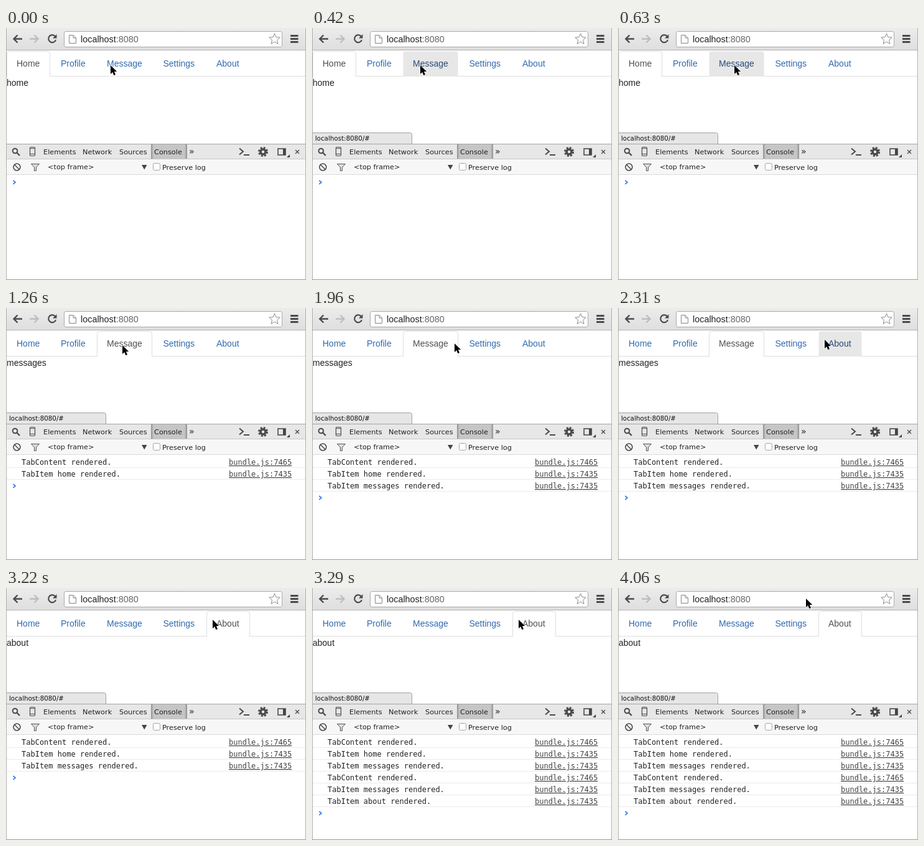
Animation, 482 px wide and 405 px high, one loop 4.13 s. Source, as an HTML page:

```html
<!DOCTYPE html>
<html lang="en">
<head>
<meta charset="utf-8">
<title>Tabs demo</title>
<style>
  html, body { margin: 0; width: 100%; height: 100%; overflow: hidden; background: #fff; }
  svg { display: block; width: 482px; height: 405px; }
  text { white-space: pre; }
  .page { font: 14px "Liberation Sans", Arial, sans-serif; fill: #222; }
  .url { font-size: 14.4px; }
  .ui { font: 11.3px "DejaVu Sans", sans-serif; fill: #222; }
  .status { font-size: 10.3px; fill: #111; }
  .log { font: 12px "DejaVu Sans Mono", monospace; fill: #222; }
  .log .link { fill: #444; text-decoration: underline; }
  .line { fill: none; stroke: #4a4a4a; stroke-width: 1.6; }
  .tab text { fill: #3069b0; }
  .tab path { fill: none; }
  .tab.hover path { fill: #e7e7e7; }
  .tab.hover text { fill: #284a78; }
  .tab.active path { fill: #fff; stroke: #ddd; }
  .tab.active text { fill: #505050; }
</style>
</head>
<body>
<svg viewBox="0 0 482 405">
  <defs>
    <linearGradient id="bar" x2="0" y2="1">
      <stop stop-color="#ececec"/><stop offset="1" stop-color="#dedede"/>
    </linearGradient>
    <linearGradient id="pressed">
      <stop stop-color="#909090"/><stop offset=".07" stop-color="#c6c6c6"/>
      <stop offset=".93" stop-color="#c6c6c6"/><stop offset="1" stop-color="#909090"/>
    </linearGradient>
  </defs>
  <rect width="482" height="405" fill="#fff"/>

  <!-- browser toolbar -->
  <rect width="482" height="36" fill="url(#bar)"/>
  <path d="M0 35.5H482" stroke="#b4b4b4"/>
  <path id="back" class="line" style="stroke-width:2.4" d="M26 17.5H13M18.5 11.5L12.5 17.5L18.5 23.5"/>
  <path class="line" style="stroke-width:2.4;stroke:#bdbdbd" d="M38 17.5H51M45.500 11.5L51.5 17.5L45.5 23.5"/>
  <path class="line" style="stroke-width:2.2" d="M79 13.500A6 6 0 1 0 80 19"/>
  <path d="M81.500 10V16.500H75Z" fill="#4a4a4a"/>
  <rect x="93.5" y="5.5" width="350" height="25" rx="3" fill="#fff" stroke="#a9a9a9"/>
  <path d="M101.500 11.500H108L112.500 16V24.500H101.500ZM108 11.500V16H112.500" fill="#fff" stroke="#858585"/>
  <text class="page url" x="120" y="23">localhost<tspan fill="#666">:8080</tspan></text>
  <path id="star" fill="#fff" stroke="#8a8a8a" stroke-linejoin="round"/>
  <path d="M457 12.500H469.500M457 17.500H469.500M457 22.500H469.500" stroke="#4a4a4a" stroke-width="2.8"/>

  <!-- page -->
  <path d="M1 77.500H481" stroke="#ddd"/>
  <g id="tabs" class="page"></g>
  <text id="content" class="page" x="1" y="93"></text>
  <g id="status">
    <path d="M.5 186V168.500H157.500Q160.500 168.500 160.500 171.500V186" fill="#e6e6e6" stroke="#a0a0a0"/>
    <text class="ui status" x="5" y="181">localhost:8080/#</text>
  </g>

  <!-- developer tools -->
  <rect y="186" width="482" height="25" fill="#e7e7e7"/>
  <path d="M0 186.500H482" stroke="#a3a3a3"/>
  <path d="M0 210.500H482" stroke="#c6c6c6"/>
  <rect y="211" width="482" height="24" fill="#f7f7f7"/>
  <path d="M0 235.500H482" stroke="#dcdcdc"/>
  <rect x="233" y="187" width="58" height="23" fill="url(#pressed)"/>
  <circle class="line" cx="14.500" cy="197.500" r="3.800" style="stroke-width:2"/>
  <path class="line" style="stroke-width:2.4" d="M17.500 200.500L22 205"/>
  <rect class="line" x="38.500" y="191.500" width="8" height="14" rx="1.500" style="stroke-width:1.200"/>
  <path class="line" style="stroke-width:1" d="M39 193.500H46M39 202.500H46"/>
  <g class="ui">
    <text x="60" y="203">Elements</text>
    <text x="123" y="203">Network</text>
    <text x="182" y="203">Sources</text>
    <text x="238" y="203">Console</text>
    <text x="294" y="203" font-size="14">»</text>
    <text x="67" y="227">&lt;top frame&gt;</text>
    <text x="251" y="228">Preserve log</text>
  </g>
  <path class="line" style="stroke-width:2" d="M375 193.500L381 198.500L375 203.500M382 204H391"/>
  <circle class="line" cx="413" cy="199" r="6.500" style="stroke-width:3;stroke-dasharray:2.900 2.205"/>
  <circle class="line" cx="413" cy="199" r="4" style="stroke-width:3.600"/>
  <rect class="line" x="437" y="194" width="12" height="10"/>
  <path d="M445 194H449V204H445ZM456 203V208H451Z" fill="#444"/>
  <path class="line" style="stroke-width:1.400" d="M465 196L471 202M471 196L465 202"/>
  <circle class="line" cx="17.500" cy="223.500" r="5.500"/>
  <path class="line" d="M13.500 219.500L21.500 227.500"/>
  <path d="M40.500 218.500H53.500L48.500 224V229.500H45.500V224Z" fill="#ddd" stroke="#555"/>
  <path d="M218 220H226.500L222.200 227.500Z" fill="#444"/>
  <rect x="236.500" y="217.500" width="11" height="11" rx="2" fill="#fff" stroke="#a5a5a5"/>
  <g id="logs" class="log"></g>
  <path id="prompt" fill="none" stroke="#3f83e8" stroke-width="1.800" d="M11.500 245L15 248L11.500 251"/>

  <path d="M.5 0V405M481.500 0V405" stroke="#adadad"/>
  <path d="M0 404.500H482" stroke="#999"/>
  <path id="cursor" d="M0 0V14L3.200 11L5.300 16L8 14.900L5.900 10H10.200Z" fill="#000" stroke="#fff" stroke-width="1.200" paint-order="stroke"/>
</svg>
<script>
const LOOP = 4130;
const $ = id => document.getElementById(id);

// name, left, right, text start
const tabs = [
  ["Home", 1, 70, 17], ["Profile", 72, 144, 88], ["Message", 146, 234, 162],
  ["Settings", 236, 320, 252.5], ["About", 322, 391, 338]
];
const logs = [
  ["TabContent", 7465], ["TabItem home", 7435], ["TabItem messages", 7435],
  ["TabContent", 7465], ["TabItem messages", 7435], ["TabItem about", 7435]
];
// Stepped tracks: each entry holds from its time on
const pointer = [
  [0, 168, 60], [280, 170, 60], [420, 174, 60], [490, 180, 60], [560, 185, 60], [630, 187, 60],
  [1890, 204, 59], [1960, 229, 57], [2030, 259, 55], [2100, 289, 53], [2170, 312, 52],
  [2240, 326, 51], [2310, 332, 51],
  [3850, 329, 47], [3920, 319, 35], [3990, 307, 22], [4060, 302, 17]
];
const page = [[0, 0, "home"], [1260, 2, "messages"], [3220, 4, "about"]];
const logCount = [[0, 0], [1260, 2], [1330, 3], [3290, 6]];
const at = (track, t) => track.findLast(k => k[0] <= t);

$("tabs").innerHTML = tabs.map(([name, l, r, x]) => `<g class="tab">
  <path d="M${l + .5} 78V41.500q0-4 4-4H${r - 3.5}q4 0 4 4V78"/>
  <text x="${x}" y="62">${name}</text></g>`).join("");

$("logs").innerHTML = logs.map(([what, line], i) => {
  const y = 252 + 19 * i;
  return `<g><text x="25" y="${y}">${what} rendered.</text>
    <text class="link" x="358" y="${y}">bundle.js:${line}</text>
    <path d="M1 ${y + 4.5}H481" stroke="#ebebeb"/></g>`;
}).join("");

$("star").setAttribute("d", "M" + Array.from({ length: 10 }, (_, i) => {
  const a = i * Math.PI / 5, r = i % 2 ? 4.2 : 9.2;
  return `${431.5 + r * Math.sin(a)} ${18 - r * Math.cos(a)}`;
}).join("L") + "Z");

function draw(t) {
  const [, x, y] = at(pointer, t);
  const [, active, text] = at(page, t);
  const [, count] = at(logCount, t);

  [...$("tabs").children].forEach((tab, i) => {
    const [, l, r] = tabs[i];
    const over = t >= 280 && y > 36 && x >= l && x <= r;
    tab.setAttribute("class", "tab" + (i === active ? " active" : over ? " hover" : ""));
  });
  $("content").textContent = text;
  $("status").style.display = t < 420 ? "none" : "";
  [...$("logs").children].forEach((row, i) => row.style.display = i < count ? "" : "none");
  $("prompt").setAttribute("transform", `translate(0 ${19 * count})`);
  $("cursor").setAttribute("transform", `translate(${x} ${y})`);
}

const start = performance.now();
function tick() {
  draw((performance.now() - start) % LOOP);
  requestAnimationFrame(tick);
}
tick();
</script>
</body>
</html>
```
